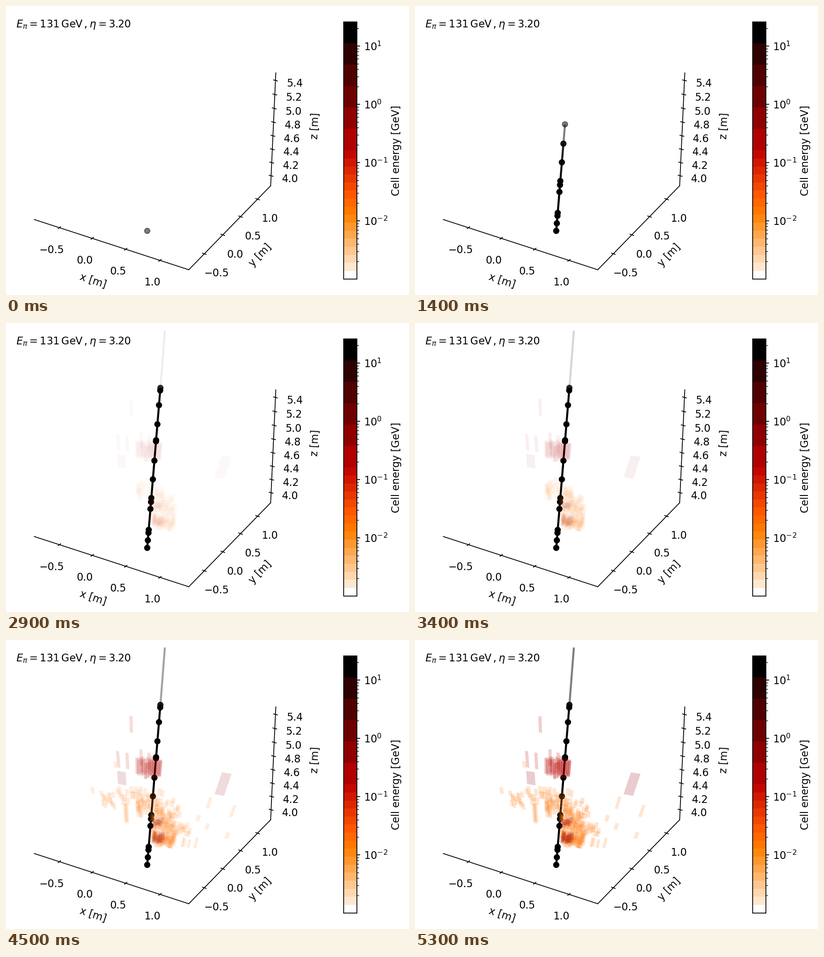
Recreate the animation shown at these times as a matplotlib script. Size 882 px wide and 635 px high, loop 6.3 s.

```python
import numpy as np
import matplotlib.pyplot as plt
from matplotlib.animation import FuncAnimation
from matplotlib.collections import LineCollection, PolyCollection
from matplotlib.patches import Rectangle

W, H, DPI = 882, 635, 160
FRAMES, STEP = 63, 100
FADE_START, FADE_STEPS = 25, 28
CELL_ALPHA = 0.2
FAINT_FROM = 0.1

plt.rcParams.update({"font.family": "DejaVu Sans", "font.size": 10.15,
                     "mathtext.fontset": "dejavusans"})
fig = plt.figure(figsize=(W / DPI, H / DPI), dpi=DPI, facecolor="white")
ax = fig.add_axes([0, 0, 1, 1])
ax.set(xlim=(-0.5, W - 0.5), ylim=(H - 0.5, -0.5))
ax.axis("off")


def label(x, y, s, rot=0, ha="center", va="center"):
    ax.text(x, y, s, rotation=rot, ha=ha, va=va, color="black")


def stroke(a, b, lw=0.8, cap="butt"):
    ax.plot(*zip(a, b), color="black", lw=lw, solid_capstyle=cap)


# ---- 3D axes ----

def draw_axis(start, end, values, place, along, tick, offset):
    """Axis line; place(v) gives the x (along=0) or y (along=1) of a value."""
    a, b = np.array(start), np.array(end)
    stroke(a, b, cap="projecting")
    for v in values:
        p = a + (b - a) * (place(v) - a[along]) / (b - a)[along]
        stroke(p - tick, p + tick, cap="projecting")
        text = f"{v:.1f}".replace("-", "\u2212")
        label(*(p + offset), text, va="center_baseline")


LEFT, FRONT, RIGHT, TOP = (61.5, 468.7), (399.5, 579), (578.7, 394.5), (590, 146.5)
halves = np.arange(-0.5, 1.1, 0.5)
fifths = np.arange(4.0, 5.5, 0.2)

# the small square terms are the perspective
draw_axis(LEFT, FRONT, halves, lambda v: 188.2 + 145.3 * v + 3 * v * v, 0,
          np.array((2.7, -2)), (-16.6, 46.5))
draw_axis(FRONT, RIGHT, halves, lambda v: 474 + 79.3 * v - 3.2 * v * v, 0,
          np.array((4, 1.4)), (26.8, 41))
draw_axis(RIGHT, TOP, fifths, lambda v: 372.5 - 143.9 * (v - 4) - 4.1 * (v - 4) ** 2, 1,
          np.array((4.2, 1.1)), (42, 4.6))
label(189.5, 604, "x [m]", -18)
label(555.5, 547, "y [m]", 46)
label(676.5, 263, "z [m]", 87.5)
label(22, 47, r"$E_\pi = 131\,\mathrm{GeV}\,, \eta = 3.20$", ha="left", va="baseline")

# ---- Colour bar: coarse dark steps, finer light steps ----

X0, X1, Y0, Y1 = 738.5, 767, 34.5, 599
MID = (Y0 + Y1) / 2
heat = plt.get_cmap("gist_heat_r")
edges = np.r_[np.linspace(Y0, MID, 7), np.linspace(MID, Y1, 17)[1:]]
levels = (Y1 - (edges[:-1] + edges[1:]) / 2) / (Y1 - Y0)
levels[0], levels[-1] = 1, 0
for top, bottom, level in zip(edges[:-1], edges[1:], levels):
    ax.add_patch(Rectangle((X0, top), X1 - X0, bottom - top, fc=heat(level), lw=0,
                           antialiased=False))
ax.add_patch(Rectangle((X0, Y0), X1 - X0, Y1 - Y0, fc="none", ec="black", lw=0.8))

for power in range(-3, 2):
    for m in range(1, 10):
        y = 215.5 - 128 * (power + np.log10(m))
        if not Y0 < y < Y1 - 2:
            continue
        stroke((X1, y), (X1 + (7.8 if m == 1 else 4.4), y), 0.8 if m == 1 else 0.6)
        if m == 1:
            label(X1 + 15.6, y, rf"$10^{{{power}}}$", ha="left", va="center_baseline")
label(854, 317, "Cell energy [GeV]", 90)

# ---- Particle track ----

rows = np.array((493.6, 477, 460.5, 454, 408, 392.7, 384, 343,
                 302, 259.5, 257, 222, 180, 147.7, 142))
points = np.c_[308.6 + 0.082 * (rows[0] - rows), rows]
reached = np.arange(len(rows)) * 8 // 5     # frame at which each point appears

segments = LineCollection(np.stack([points[:-1], points[1:]], axis=1),
                          linewidths=2, zorder=3)
dots = ax.scatter(*points.T, s=26, linewidths=1, zorder=4)
ax.add_collection(segments)
exit_line, = ax.plot((points[-1, 0], 347.2), (rows[-1], 16), color="black", lw=2,
                     solid_capstyle="butt", zorder=3)

# ---- Calorimeter cells ----

rng = np.random.default_rng(7)
ORANGE, RED, DARK = (1, 0.5, 0.1), (0.73, 0.03, 0.02), (0.58, 0, 0.02)
quads, colours, faint = [], [], []


def add_cell(x, y, w, h, colour, is_faint=False):
    """Slanted cell; those further right lean more."""
    lean = np.clip((x - 290) / 550, -0.12, 0.35) * h / 2
    drop = w * 0.08
    quads.append([(x - w / 2 + lean, y - h / 2 - drop), (x + w / 2 + lean, y - h / 2 + drop),
                  (x + w / 2 - lean, y + h / 2 + drop), (x - w / 2 - lean, y + h / 2 - drop)])
    colours.append(colour)
    faint.append(is_faint)


def fill(n, xs, ys, size, colour=ORANGE, is_faint=False):
    """Cells spread over a box, one per column slot so that they cover it evenly."""
    slots = (np.arange(n) + rng.random(n)) / n
    for u, v in zip(slots, rng.permutation(slots)):
        w, h = np.array(size) * rng.uniform(0.85, 1.15, 2)
        add_cell(xs[0] + u * (xs[1] - xs[0]), ys[0] + v * (ys[1] - ys[0]),
                 w, h, colour, is_faint)


# thin halo, left arm to right arm
fill(14, (207, 238), (335, 366), (8, 13), is_faint=True)
fill(8, (243, 268), (326, 358), (9, 14), is_faint=True)
fill(3, (259, 267), (378, 382), (7, 42), is_faint=True)
fill(24, (272, 342), (328, 362), (9, 16), is_faint=True)
fill(11, (347, 382), (350, 390), (9, 14), is_faint=True)
fill(14, (368, 402), (405, 428), (9, 14), is_faint=True)
fill(4, (377, 417), (443, 447), (6, 21), is_faint=True)
for x, y in ((189, 330), (239, 273), (420, 391), (440, 409), (484, 429)):
    add_cell(x, y, 8, 14, ORANGE, True)
for x, y in ((444, 357), (496, 375)):
    add_cell(x, y, 7, 26, ORANGE, True)

# shower core
fill(8, (286, 297), (355, 383), (8, 22))
fill(9, (297, 318), (348, 380), (8, 17))
fill(24, (319, 346), (364, 398), (9, 16))
fill(12, (340, 366), (382, 404), (9, 14))
fill(34, (321, 370), (400, 420), (9, 14))
fill(64, (320, 369), (425, 448), (8, 18))
fill(8, (320, 342), (396, 405), (8, 13), DARK)
fill(12, (320, 345), (429, 440), (7, 20), DARK)

# upper cluster of tall columns, densest near the track
for i, x in enumerate(np.linspace(285, 337, 14)):
    depth = 1 + i % 2 + int(2 * (1 - abs(x - 317) / 40))
    for y in 279 + 0.1 * (x - 310) + rng.normal(0, 4, depth):
        add_cell(x + rng.normal(0, 0.8), y, 6.5, 35, RED)
for x, y in ((295, 258), (312, 265), (273.5, 185), (245, 261.5), (265, 265)):
    add_cell(x, y, 7, 36, RED)
add_cell(253, 303, 18.5, 29, DARK)
add_cell(474.5, 316, 21, 48, DARK)

rgba = np.c_[np.array(colours, float), np.zeros(len(colours))]
faint = np.array(faint)
cells = PolyCollection(quads, linewidths=0, zorder=6)
ax.add_collection(cells)


def black(alpha):
    return np.c_[np.zeros((len(alpha), 3)), alpha]


def update(frame):
    fade = np.clip((frame - FADE_START) / FADE_STEPS, 0, 1)

    # every pass lays another half-transparent coat over the track so far
    clock = min(frame, reached[-1]) + (frame >= 24)
    coats = np.maximum(clock - reached + 1, 0)
    alpha = 1 - 0.5 ** coats * (1 - 0.5 * fade)
    segments.set_color(black(alpha[1:]))
    dots.set_facecolor(black(alpha))
    dots.set_edgecolor(black(alpha))
    exit_line.set_alpha(0.5 * fade)

    level = CELL_ALPHA * fade
    rgba[:, 3] = np.where(faint & (level < FAINT_FROM), 0, level)
    cells.set_facecolor(rgba)
    return segments, dots, exit_line, cells


anim = FuncAnimation(fig, update, frames=FRAMES, interval=STEP,
                     init_func=lambda: update(0), repeat=True, repeat_delay=0)
plt.show()
```
